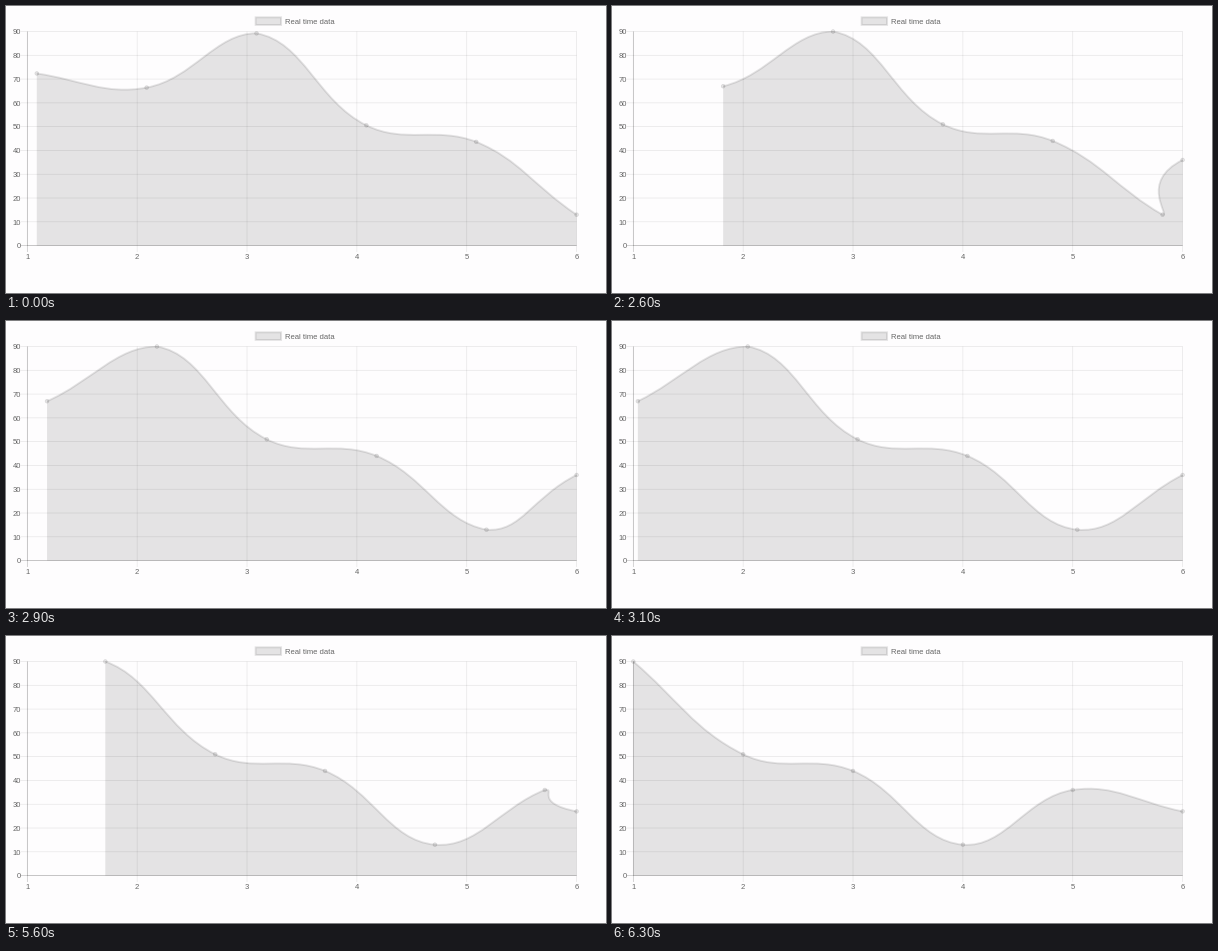
These frames come from a looping animation (600x287 px, 8000 ms). A matplotlib script:

```python
import matplotlib.pyplot as plt
import numpy as np
from matplotlib.animation import FuncAnimation
from matplotlib.patches import Circle, PathPatch, Rectangle
from matplotlib.path import Path

WIDTH, HEIGHT, DPI = 600, 287, 64
PX = 72 / DPI                      # points per pixel
FRAMES, STEP = 80, 100
SCALE = 0.637                      # chart drawn at reduced size
LEFT, RIGHT, TOP, BOTTOM = 21.3, 570.6, 25.5, 239.6
TICK = 10 * SCALE
LINE = 3 * SCALE
FAINT = (0, 0, 0, 0.1)
AXIS = (0, 0, 0, 0.25)
INK = "#666666"
FONT = 12 * SCALE

VALUES = [100, 73, 67, 90, 51, 44, 13, 36, 27]
SHOWN = 6
STARTS = [-458, 2551, 5518]        # when each new value arrives, in ms
DURATION = 1000

slots = np.linspace(LEFT, RIGHT, SHOWN)


def value_y(value, top=90):
    return BOTTOM - np.asarray(value) / top * (BOTTOM - TOP)


def layout(first, top=90, tension=0.4):
    """Rows of (incoming control, point, outgoing control) for one window."""
    points = np.column_stack([slots, value_y(VALUES[first:first + SHOWN], top)])
    before = np.vstack([points[:1], points[:-1]])
    after = np.vstack([points[1:], points[-1:]])
    d_in = np.linalg.norm(points - before, axis=1)
    d_out = np.linalg.norm(after - points, axis=1)
    share = (d_in / (d_in + d_out))[:, None]
    chord = tension * (after - before)
    nodes = np.stack([points - share * chord, points,
                      points + (1 - share) * chord], axis=1)
    return np.clip(nodes, (LEFT, TOP), (RIGHT, BOTTOM))


def nodes_at(ms):
    step = max(i for i, start in enumerate(STARTS) if ms >= start)
    remaining = (1 - min((ms - STARTS[step]) / DURATION, 1)) ** 4
    if remaining < 0.0035:
        remaining = 0
    old = layout(step, 100 if step == 0 else 90)
    new = layout(step + 1)
    nodes = new.copy()
    # surviving points slide one slot; the newest appears in place
    nodes[:-1] += remaining * (old[1:] - new[:-1])
    return nodes


def curve_paths(nodes):
    verts = nodes.reshape(-1, 2)[1:-1]
    codes = [Path.MOVETO] + [Path.CURVE4] * (len(verts) - 1)
    base = [(verts[-1][0], BOTTOM), (verts[0][0], BOTTOM), verts[0]]
    area = Path(np.vstack([verts, base]),
                codes + [Path.LINETO, Path.LINETO, Path.CLOSEPOLY])
    return Path(verts, codes), area


fig = plt.figure(figsize=(WIDTH / DPI, HEIGHT / DPI), dpi=DPI,
                 facecolor="#fefdfe")
ax = fig.add_axes([0, 0, 1, 1])
ax.set(xlim=(0, WIDTH), ylim=(HEIGHT, 0))
ax.axis("off")


def rule(xs, ys, color=FAINT):
    ax.plot(xs, ys, color=color, lw=SCALE * PX, solid_capstyle="butt",
            snap=False, zorder=1)


def label(x, y, text, ha):
    ax.text(x, y, text, ha=ha, va="baseline", color=INK,
            family="Liberation Sans", size=FONT * PX)


for i, x in enumerate(slots):
    rule([x, x], [TOP, BOTTOM + TICK], FAINT if i else AXIS)
    label(x, 252.9, str(i + 1), "center")
for value in range(0, 100, 10):
    y = value_y(value)
    rule([LEFT - TICK, RIGHT], [y, y], FAINT if value else AXIS)
    label(LEFT - TICK + 0.3, y + 2.7, str(value), "right")
rule([LEFT, LEFT], [TOP, BOTTOM])
rule([LEFT, RIGHT], [BOTTOM, BOTTOM])

ax.add_patch(Rectangle((249.6, 11.3), 40 * SCALE, FONT, fc=FAINT, ec=FAINT,
                       lw=LINE * PX, snap=False))
label(278.6, 17.5, "Real time data", "left")

empty = Path([(0, 0), (0, 0)])
area = ax.add_patch(PathPatch(empty, fc=FAINT, ec="none", zorder=2))
line = ax.add_patch(PathPatch(empty, fc="none", ec=FAINT, lw=LINE * PX,
                              joinstyle="miter", capstyle="butt", zorder=3))
window = Rectangle((LEFT, TOP - LINE / 2), RIGHT - LEFT, BOTTOM - TOP + LINE,
                   transform=ax.transData)
for patch in (area, line):
    patch.set_clip_path(window)
dots = [ax.add_patch(Circle((0, 0), 3 * SCALE, fc=FAINT, ec=FAINT,
                            lw=SCALE * PX, zorder=4)) for _ in range(SHOWN)]


def update(frame):
    nodes = nodes_at(frame * STEP)
    stroke, fill = curve_paths(nodes)
    line.set_path(stroke)
    area.set_path(fill)
    for dot, center in zip(dots, nodes[:, 1]):
        dot.center = center
    return [area, line, *dots]


anim = FuncAnimation(fig, update, frames=FRAMES, interval=STEP, repeat=True,
                     repeat_delay=0, blit=False)
plt.show()
```
